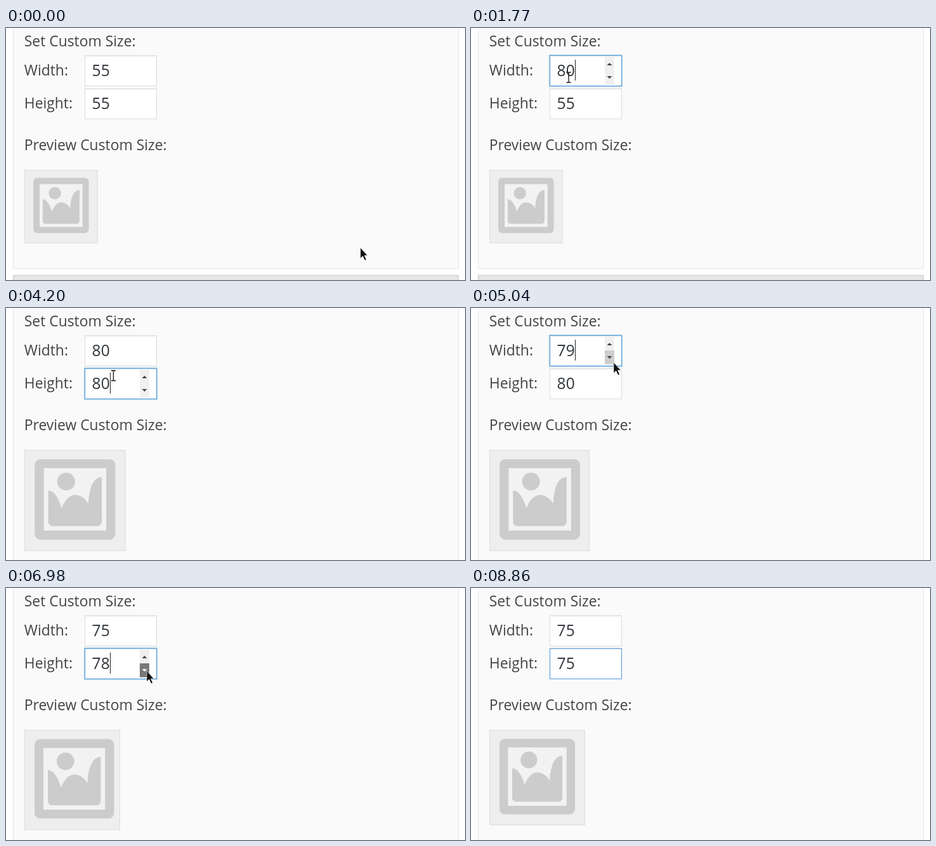
An HTML page that plays this animation: 724x398 px, repeating every 8.97 s.

```html
<!DOCTYPE html>
<html lang="en">
<head>
<meta charset="utf-8">
<title>Custom size preview</title>
<style>
  html, body { margin: 0; width: 100%; height: 100%; overflow: hidden; background: #fff; }
  svg { display: block; width: 724px; height: 398px; }
  text { font-family: "Open Sans", "Noto Sans", sans-serif; white-space: pre; }
  .label { font-size: 22.88px; fill: #444; }
  .value { font-size: 24.64px; }
</style>
</head>
<body>
<svg id="stage" viewBox="0 0 724 398" xmlns="http://www.w3.org/2000/svg"></svg>
<script>
const LOOP = 8970;
const ZOOM = 1.76;
const STEP = 80;
const CLICKS = 5;
const BLUR = 8740;
const stage = document.getElementById('stage');

// Each field is typed into once, then stepped down by a run of clicks.
const width = { y: 43, focus: 700, edit: 1770, apply: 2070, first: 4830, last: 6050, bend: 0.75, hold: 65 };
const height = { y: 95, focus: 2710, edit: 3420, apply: 3890, first: 6820, last: 7920, bend: 1.4, hold: 150 };

// Pointer moves: start, end, end point
const moves = [
  [70, 450, [154, 78]],
  [2240, 2400, [150, 114]],
  [4040, 4680, [225, 86]],
  [6270, 6570, [222, 131]],
  [8060, 8590, [690, 412]]
];

const ease = p => p * p * (3 - 2 * p);
const between = (t, a, b) => t >= a && t < b;

const clickTime = (f, i) => f.first + (f.last - f.first) * (i / (CLICKS - 1)) ** f.bend;

function clicksBy(f, t) {
  let n = 0;
  while (n < CLICKS && clickTime(f, n) <= t) n++;
  return n;
}

const typed = (f, t) => t < f.edit ? 55 : 80 - clicksBy(f, t);
const shown = (f, t) => t < f.apply ? 55 : 80 - clicksBy(f, t - f.hold);
const pressed = (f, t) => clicksBy(f, t) > clicksBy(f, t - f.hold);

function focusedField(t) {
  if (t < width.focus || t >= BLUR) return null;
  return t < height.focus || between(t, width.first, height.first) ? width : height;
}

// The pointer advances in even time steps along each eased move.
function pointer(t) {
  let pos = [559, 347];
  for (const [t0, t1, to] of moves) {
    if (t < t0) break;
    const gaps = Math.round((t1 - t0) / STEP);
    const step = Math.min(gaps, Math.floor((t - t0) / (t1 - t0) * gaps)) + 1;
    const p = ease(step / (gaps + 1));
    pos = pos.map((a, i) => a + (to[i] - a) * p);
  }
  return pos;
}

const rect = (x, y, w, h, attrs) =>
  `<rect x="${x}" y="${y}" width="${w}" height="${h}" ${attrs}/>`;
const label = (y, s) => `<text class="label" x="28.8" y="${y}">${s}</text>`;
const isOver = (f, [x, y]) => x >= 124 && x <= 238 && y >= f.y && y <= f.y + 49;

function spinner(y, over, down) {
  const lit = over && (down ? '#787878' : '#cdcdcd');
  return rect(211, y + 2, 15, 44, 'fill="#f0f0f0"') +
    (lit ? rect(211, y + (over === 'up' ? 2 : 24), 15, 22, `fill="${lit}"`) : '') +
    `<path d="M214.5 ${y + 16}h8l-4-4z" fill="#444"/>` +
    `<path d="M214.5 ${y + 33}h8l-4 4z" fill="${over === 'down' && down ? '#fff' : '#444'}"/>`;
}

function field(f, t, mouse) {
  const { y } = f, [mx, my] = mouse;
  const focused = focusedField(t) === f;
  const selected = between(t, f.focus + 100, f.edit);
  const hover = isOver(f, mouse);
  const over = hover && between(mx, 211, 227) ? (my < y + 24 ? 'up' : 'down') : '';
  const blurring = f === height && t >= BLUR;
  const box = [124.5, y + 0.5, 113, 48];
  let s = '';
  if (focused) s += rect(...box, 'fill="none" stroke="#1e8cbe" stroke-width="3.4" opacity=".3"');
  s += rect(...box, `fill="#fff" stroke="${focused || blurring ? '#5b9dd9' : '#ddd'}" stroke-width="1.1"`);
  s += rect(125, y + 1, 112, 2, 'fill="#000" opacity=".04"');
  if (focused || hover) s += spinner(y, over, pressed(f, t));
  if (selected) s += rect(136, y + 7, 29, 33, 'fill="#3399ff"');
  s += `<text class="value" x="135.6" y="${y + 33}" fill="${selected ? '#fff' : '#32373c'}">${typed(f, t)}</text>`;
  if (focused && !selected) s += rect(164, y + 7, 1, 33, 'fill="#222"');
  return s;
}

function preview(w, h) {
  const unit = ZOOM * h / 20;
  const bw = ZOOM * w + 19, bh = ZOOM * h + 19;
  const x = Math.max(38.2, 29 + bw / 2 - 10 * unit);
  return rect(29.5, 224.5, bw - 1, bh - 1, 'fill="#eee" stroke="#ddd"') +
    `<g transform="translate(${x} 231.9) scale(${unit})">` +
    rect(3, 3, 14, 14, 'fill="#f2f2f2"') +
    rect(2, 2, 16, 16, 'rx=".25" fill="none" stroke="#ccc" stroke-width="2"') +
    rect(1.4, 1.4, 17.2, 17.2, 'rx=".85" fill="none" stroke="#ccc" stroke-width=".8"') +
    '<g fill="#ccc"><circle cx="8" cy="6" r="2"/>' +
    '<path d="M13 11s0-6 3-6v10c0 .55-.45 1-1 1H5c-.55 0-1-.45-1-1V8c2 0 3 4 3 4s1-3 3-3 3 2 3 2z"/></g></g>';
}

function cursor(mouse) {
  const [x, y] = mouse;
  const overText = x < 211 && (isOver(width, mouse) || isOver(height, mouse));
  const shape = overText
    ? '<path d="M-3.5-8H-1L0-7L1-8H3.5M0-7V7M-3.5 8H-1L0 7L1 8H3.5" fill="none" stroke="#111" stroke-width="1.3"/>'
    : '<path d="M0 0V16.8L3.8 13.2L6.8 20L9.4 18.9L6.5 12.2H11.2Z" fill="#111" stroke="#fff" stroke-width=".6"/>';
  return `<g transform="translate(${x} ${y})">${shape}</g>`;
}

function draw(t) {
  const w = shown(width, t), h = shown(height, t), mouse = pointer(t);
  const bottom = 283.5 + ZOOM * h;
  stage.innerHTML =
    rect(11.5, -10, 702, bottom + 10, 'fill="#fafafa" stroke="#e5e5e5"') +
    rect(11.5, bottom + 10, 702, 40, 'fill="#e5e5e5" stroke="#ccc"') +
    label(29, 'Set Custom Size:') +
    label(75, 'Width:') +
    label(127, 'Height:') +
    label(193, 'Preview Custom Size:') +
    field(width, t, mouse) +
    field(height, t, mouse) +
    preview(w, h) +
    cursor(mouse);
}

const start = performance.now();
function tick() {
  draw((performance.now() - start) % LOOP);
  requestAnimationFrame(tick);
}
tick();
</script>
</body>
</html>
```
